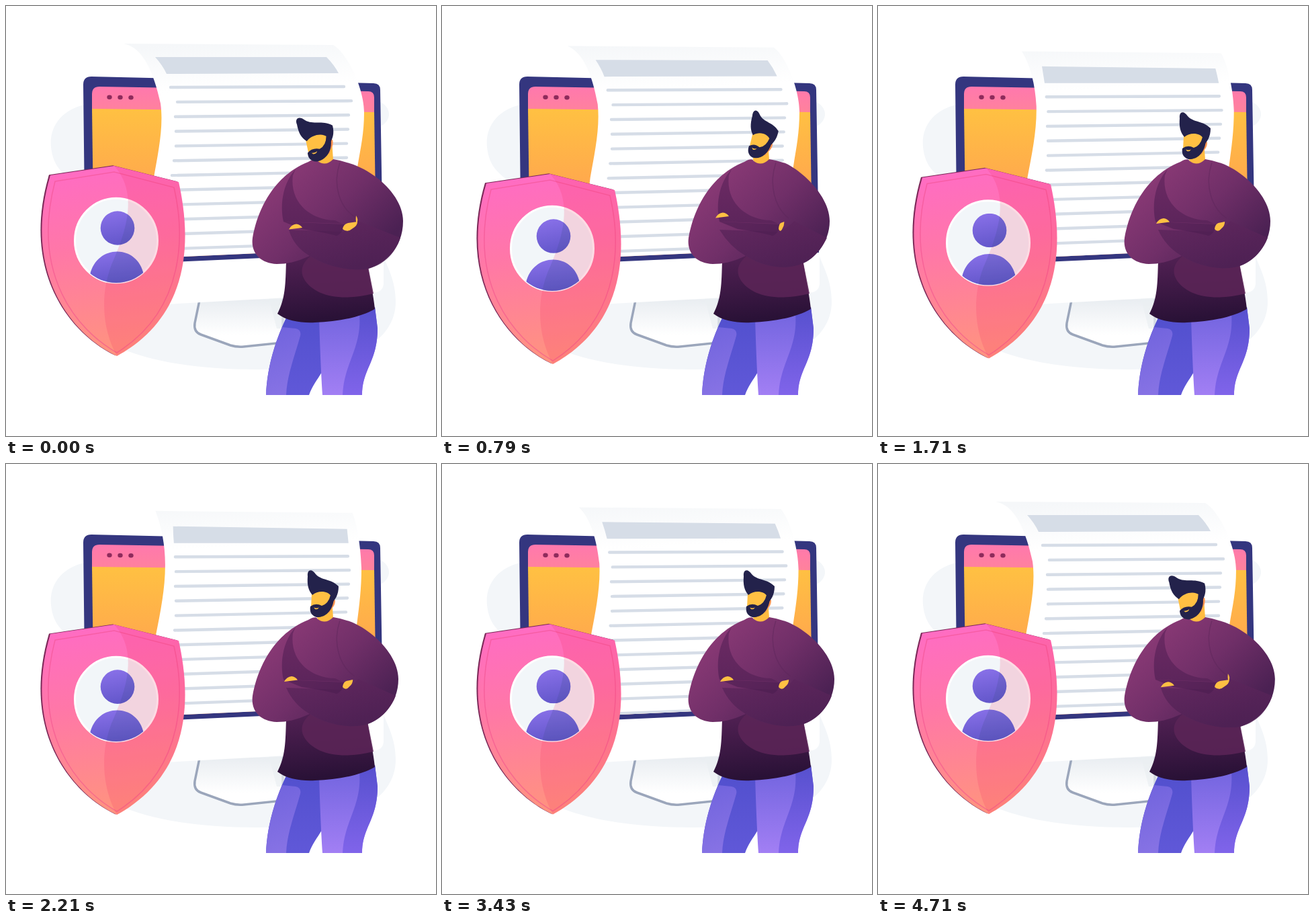
These frames come from a looping animation (640 by 640 pixels, 4.78 s). An HTML page:

```html
<!DOCTYPE html>
<html lang="en">
<head>
<meta charset="utf-8">
<title>Data protection</title>
<style>
html, body { margin: 0; width: 100%; height: 100%; overflow: hidden; background: #fff; }
svg { display: block; width: 100%; height: 100%; }
</style>
</head>
<body>
<svg viewBox="0 0 640 640">
  <defs>
    <linearGradient id="yellow" x2="0" y2="1"><stop stop-color="#ffc142"/><stop offset=".55" stop-color="#ffa64e"/><stop offset="1" stop-color="#ff9152"/></linearGradient>
    <linearGradient id="pink" x2="0" y2="1"><stop stop-color="#ff78ae"/><stop offset="1" stop-color="#ff829c"/></linearGradient>
    <linearGradient id="paper" gradientUnits="userSpaceOnUse" x1="300" y1="55" x2="304" y2="125"><stop stop-color="#f5f7f9"/><stop offset="1" stop-color="#fff"/></linearGradient>
    <linearGradient id="stand" x2="0" y2="1"><stop stop-color="#e9edf1"/><stop offset=".75" stop-color="#fff"/></linearGradient>
    <linearGradient id="guard" x2=".1" y2="1"><stop stop-color="#ff6bc6"/><stop offset=".45" stop-color="#ff77a8"/><stop offset="1" stop-color="#ff9280"/></linearGradient>
    <linearGradient id="violet" x2=".2" y2="1"><stop stop-color="#8b72ea"/><stop offset="1" stop-color="#6558cc"/></linearGradient>
    <linearGradient id="wool" gradientUnits="userSpaceOnUse" x1="400" y1="260" x2="520" y2="390"><stop stop-color="#893975"/><stop offset=".5" stop-color="#702f68"/><stop offset="1" stop-color="#4b2153"/></linearGradient>
    <linearGradient id="fold" gradientUnits="userSpaceOnUse" x1="450" y1="240" x2="460" y2="390"><stop stop-color="#6d2a64"/><stop offset="1" stop-color="#4f2154"/></linearGradient>
    <linearGradient id="hem" x2=".1" y2="1"><stop offset=".1" stop-color="#552256"/><stop offset="1" stop-color="#291136"/></linearGradient>
    <linearGradient id="legBack" x2="0" y2="1"><stop stop-color="#5250ce"/><stop offset="1" stop-color="#6058d8"/></linearGradient>
    <linearGradient id="legLight" x2=".2" y2="1"><stop stop-color="#7063dd"/><stop offset="1" stop-color="#8672e4"/></linearGradient>
    <linearGradient id="legFront" x2="0" y2="1"><stop stop-color="#7063de"/><stop offset="1" stop-color="#a27ff4"/></linearGradient>
    <linearGradient id="legSide" x2="0" y2="1"><stop stop-color="#5650ce"/><stop offset="1" stop-color="#8064ea"/></linearGradient>
    <clipPath id="display"><path d="M100 0H600V358L118 379.5Z"/></clipPath>
    <clipPath id="badge"><ellipse cx="164" cy="349" rx="62" ry="63"/></clipPath>
    <clipPath id="person"><circle cx="166" cy="330.500" r="25.300"/><path d="M125 400C135 354 196 354 205 400L195 420H135Z"/></clipPath>
    <path id="plate" d="M66 252L161 238 257 262C272 330 285 455 165 521C99 490 23 398 66 252Z"/>
    <path id="sheen" d="M161 238L257 262C272 330 285 455 165 521C143 480 140 430 157 385C177 340 199 280 161 238Z"/>
  </defs>

  <path fill="#f3f6f9" d="M117 147C80 155 58 185 70 225C76 246 95 258 120 275L130 470C140 495 160 507 185 515C240 535 320 544 420 540C500 535 580 505 580 440C580 408 567 388 561 370L555 180C575 172 575 150 555 142Z"/>

  <g id="monitor">
    <path fill="url(#stand)" stroke="#9ba6bb" stroke-width="3.5" d="M288 438L281 472Q279 485 290 489L334 505Q343 508 354 507L412 501 412 436"/>
    <path fill="#ebeff3" opacity=".7" d="M391 434L403 480H420V430Z"/>
    <path fill="#fff" d="M118 378V452L255 443 548 427Q562 425 562 412V366Z"/>
    <path fill="#34367f" d="M115 117Q115 105 127 105L547 115Q557 115 557 125L561 367 118 387Z"/>
    <path fill="url(#yellow)" d="M128 152L548 157 551 360 131 379Z"/>
    <path fill="url(#pink)" d="M128 153V131Q128 120 139 120L539 127Q548 127 548 136V158Z"/>
    <g fill="#8e2b5c"><ellipse cx="154" cy="135.700" rx="3.700" ry="3.200"/><ellipse cx="170" cy="136" rx="3.700" ry="3.200"/><ellipse cx="186" cy="136.300" rx="3.700" ry="3.200"/></g>
  </g>

  <g clip-path="url(#display)">
    <path id="page" fill="url(#paper)"/>
    <path id="title" fill="#d6dde7"/>
    <path id="lines" fill="none" stroke="#d6dde7" stroke-width="4.400" stroke-linecap="round"/>
  </g>

  <g id="shield">
    <use href="#plate" fill="#7b2858" x="-2" y="-.7"/>
    <use href="#plate" fill="url(#guard)"/>
    <path fill="none" stroke="#f0508f" stroke-opacity=".55" stroke-width="1.500" d="M73 261L161 247 250 270C265 335 270 450 165 516C105 482 37 400 73 261Z"/>
    <ellipse cx="164" cy="349" rx="62" ry="63" fill="#f2f6f9"/>
    <ellipse cx="164" cy="349" rx="61.500" ry="62.800" fill="none" stroke="#fff" stroke-width="3"/>
    <use href="#sheen" fill="#f02e62" fill-opacity=".17"/>
    <g clip-path="url(#badge)">
      <g clip-path="url(#person)">
        <g fill="url(#violet)"><path d="M140 305H192V356H140Z"/><path d="M125 364H205V412H125Z"/></g>
        <use href="#sheen" fill="#3c4a86" fill-opacity=".2"/>
      </g>
    </g>
  </g>

  <g id="man">
    <path fill="url(#legBack)" d="M417 464C395 510 388 550 387 579H451C456 565 463 557 470 545L475 462Z"/>
    <path fill="url(#legLight)" d="M411 478L431 480Q440 482 438 491C430 520 418 550 417 579H387C388 548 396 512 411 478Z"/>
    <path fill="url(#legFront)" d="M466 464C467 500 469 550 471 579H530C530 540 553 530 553 480L549 448Z"/>
    <path fill="url(#legSide)" d="M526 458C530 510 503 530 501 579H530C530 540 553 530 553 480L549 448Z"/>
    <path fill="url(#hem)" d="M417 378C416 415 416 435 404 458C418 469 440 472 460 471C495 470 528 463 549 451C547 430 541 405 537 378L470 355Z"/>
    <path fill="#5c2558" opacity=".85" d="M455 371C440 382 437 395 444 407C458 430 495 441 547 428L537 378Z"/>
    <path fill="#ffbb40" d="M464 215L463 229Q466 236 476 235.500Q488 235 487 229L485 200Z"/>
    <path id="sweater" fill="url(#wool)"/>
    <path fill="url(#fold)" d="M431 243C410 266 408 300 413 321L500 324 490 319C450 318 422 290 427 252Z"/>
    <path id="sleeve" fill="url(#fold)" opacity=".8"/>
    <path id="crease" fill="none" stroke="#5b2659" stroke-opacity=".45" stroke-width="1.500"/>
    <path fill="#4c1d50" opacity=".6" d="M413 321L503 325C503 333 497 341 492 342Q475 337 440 332Z"/>
    <path id="handLeft" fill="#ffc043" d="M421 332.500Q425 325 432 324.500Q438 325 441 330Q431 331 421 332.500Z"/>
    <g id="handRight" fill="#ffc043">
      <path d="M501 332Q502 325 509 323L523 321Q523 327 516 331Q508 338 501 332Z"/>
      <path id="thumb" d="M521 312Q525 318 522 323Q520 320 521 312Z"/>
    </g>
    <g id="head">
      <path fill="#ff9450" d="M483 206Q487 199 490 203Q490 211 484 216Q481 224 479 220Z"/>
      <path fill="#ffc043" d="M455 193Q463 186 480 187L486 200 480 217 466 222 454 213Z"/>
      <path fill="#23224b" d="M449 167C448 157 455 155 461 164C470 174 483 170 495 182C495 195 490 202 484 208L484 197C480 189 465 187 456 195C450 188 448 180 449 167Z"/>
      <path fill="#23224b" d="M453 212Q461 206 470 211Q480 208 483 195L488 201C486 220 474 229 462 228C453 225 452 218 453 212Z"/>
      <path fill="#ffc043" d="M458 213.500Q462 215.500 466 213.500Q464 217 460 216Z"/>
    </g>
  </g>
</svg>
<script>
const LOOP = 4780, FPS = 14;
const part = id => document.getElementById(id);
const set = (id, name, value) => part(id).setAttribute(name, value);
const mix = (a, b, k) => a + (b - a) * k;

// Smooth curve through [time, value] keys, flat at turning points.
function curve(keys) {
  const gradient = (a, b) => (b[1] - a[1]) / (b[0] - a[0]);
  const slopes = keys.map((key, i) => {
    if (!i || i === keys.length - 1) return 0;
    const before = gradient(keys[i - 1], key), after = gradient(key, keys[i + 1]);
    return before * after <= 0 ? 0 : 2 * before * after / (before + after);
  });
  return t => {
    let i = 0;
    while (i < keys.length - 2 && t > keys[i + 1][0]) i++;
    const [t0, v0] = keys[i], [t1, v1] = keys[i + 1];
    const span = t1 - t0, u = (t - t0) / span, w = 1 - u;
    return v0 * w * w * (1 + 2 * u) + v1 * u * u * (3 - 2 * u)
      + span * u * w * (slopes[i] * w - slopes[i + 1] * u);
  };
}

const drop = curve([[0, 0], [570, 12.3], [670, 15], [790, 12], [1140, 9.3], [1290, 7], [1710, 3.5],
  [2170, 0.9], [2640, 9], [2860, 7], [3430, 0.5], [3960, 0], [LOOP, 0]]);
const lean = curve([[0, 0], [570, 0.8], [790, 1], [1140, 0.76], [1290, 0.64], [1710, 0.5], [4000, 0.5], [LOOP, 0]]);
const tilt = curve([[0, -15], [570, 5], [790, 11], [1290, -4], [1710, 0], [4000, 0], [LOOP, -15]]);

// Fills the numbers of one path shape with a blend of two poses.
function blend(from, to, k) {
  const goal = to.match(/[\d.]+/g);
  let i = 0;
  return from.replace(/[\d.]+/g, n => mix(+n, +goal[i++], k).toFixed(2));
}

const pageUp = "M175 56C205 62 220 100 230 145C235 180 226 220 220 255L205 385L530 370L523 240C528 210 533 190 533 158C533 125 510 72 487 58Z";
const pageDown = "M223 70C232 95 237 120 237 150C237 185 230 220 223 255L205 385L530 370L522 240C526 210 529 185 529 155C528 125 523 90 516 73Z";
const titleUp = "M222 76L477 76Q488 87 495 100L239 101Q233 88 222 76Z";
const titleDown = "M249 93L508 97Q509 108 510 118L250 118Q249 106 249 93Z";
const leftUp = [245, 255, 252, 253, 253, 250, 247];
const leftDown = [252, 253, 252, 253, 253, 251, 250];
const rightUp = [503, 514, 510, 509, 507];
const rightDown = [509, 511, 510, 508, 506];

function drawPage(k) {
  set("page", "d", blend(pageUp, pageDown, k));
  set("title", "d", blend(titleUp, titleDown, k));
  const at = (list, i) => list[Math.min(i, list.length - 1)];
  let d = "";
  for (let i = 0; i < 12; i++) {
    const y = 121 + 21.85 * i + 17.5 * k;
    const x1 = mix(at(leftUp, i), at(leftDown, i), k), x2 = mix(at(rightUp, i), at(rightDown, i), k);
    const rise = Math.min(1 + 0.7 * i, 9) + k * Math.min(i * 0.4, 1.5);
    d += `M${x1} ${y}L${x2} ${y - rise}`;
  }
  set("lines", "d", d);
}

function drawMan(p, angle) {
  const x = 591 - 14 * p, elbow = `${539 - 2 * p} ${391 - 8 * p}`;
  const under = `${elbow}C507 396 470 384 452 372`;
  set("sweater", "d", `M450 232C458 227 463 228 463 230Q475 240 487 228Q500 230 511 234C${x - 38} 247 ${x} 285 ${x} 320` +
    `C${x} ${362 - 8 * p} ${562 - 10 * p} ${384 - 6 * p} ${under}C432 381 418 384 403 384C378 383 364 367 367 345C375 300 400 252 450 232Z`);
  set("sleeve", "d", `M${421 - 8 * p} 333L500 336Q515 ${334 - 4 * p} 524 320L${x - 4} 345` +
    `C${x - 12} ${370 - 8 * p} ${560 - 10 * p} ${386 - 8 * p} ${under}Q428 358 ${421 - 8 * p} 333Z`);
  set("crease", "d", `M497 233C486 265 495 300 ${522 - 6 * p} 316`);
  set("handLeft", "transform", `translate(${-14 * p} ${-17 * p})`);
  set("handRight", "transform", `translate(501 332) scale(${1 - 0.62 * p} 1) translate(-501 -332)`);
  set("thumb", "opacity", Math.max(0, 1 - 2 * p));
  set("head", "transform", `translate(475 222) rotate(${angle}) scale(${1 - 0.007 * angle} 1) translate(-475 -222)`);
}

function draw(now) {
  const frame = Math.floor((now % LOOP + 5) * FPS / 1000);
  const t = Math.min(frame * 1000 / FPS, LOOP);
  drawPage((1 - Math.cos(2 * Math.PI * t / LOOP)) / 2);
  set("shield", "transform", `translate(0 ${drop(t)})`);
  drawMan(lean(t), tilt(t));
}

const start = performance.now();
function tick() {
  draw(performance.now() - start);
  requestAnimationFrame(tick);
}
tick();
</script>
</body>
</html>
```
